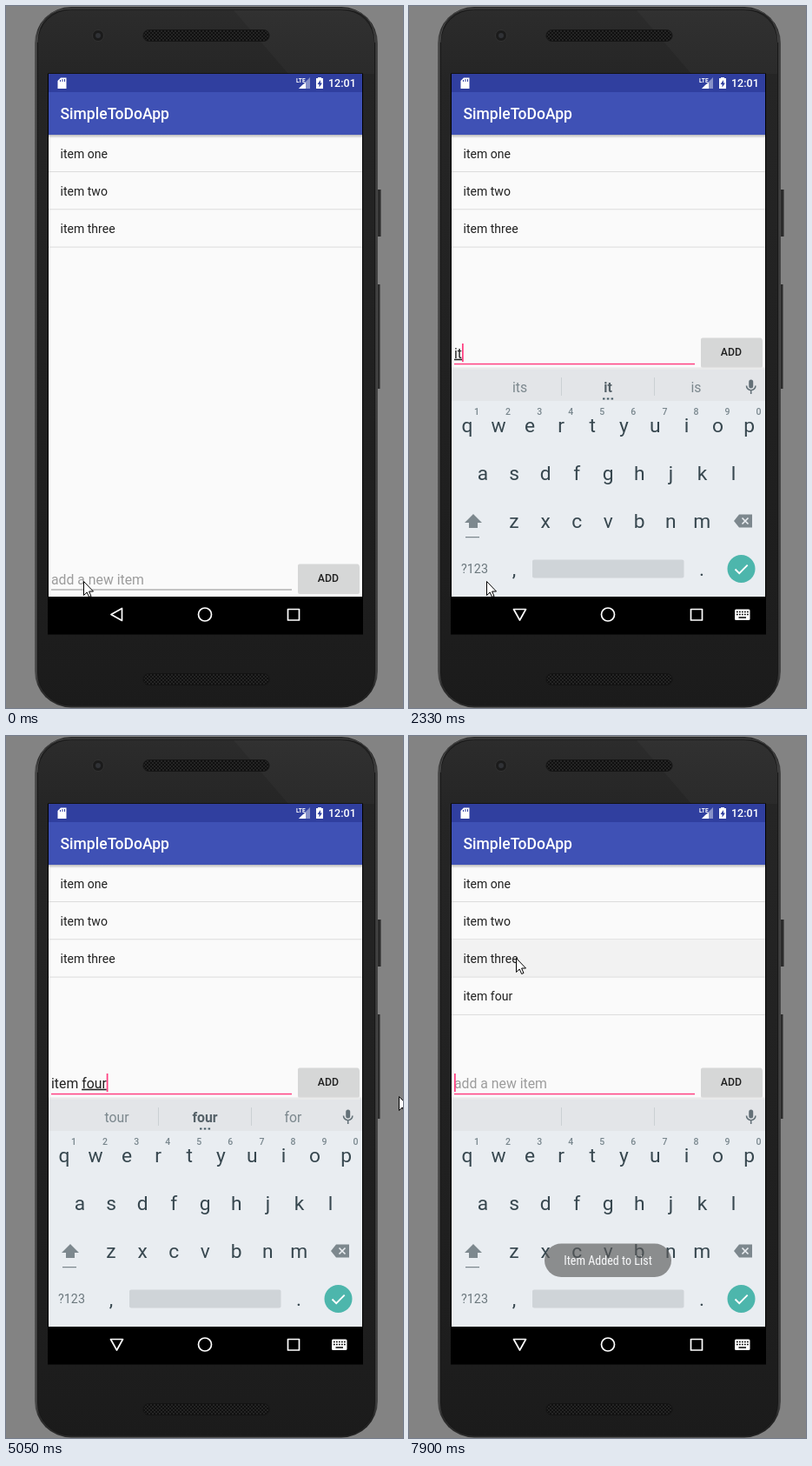
Animation, 457 px wide and 807 px high, one loop 8 s. Source, as an HTML page:

```html
<!DOCTYPE html>
<html lang="en">
<head>
<meta charset="utf-8">
<title>To-do app</title>
<style>
html, body { margin: 0; width: 100%; height: 100%; overflow: hidden; background: #838383; }
svg { display: block; width: 457px; height: 807px; font-family: Roboto, sans-serif; }
text { white-space: pre; }
.mid { text-anchor: middle; }
.row { font-size: 14.05px; fill: #212121; }
.key { font-size: 22.8px; fill: #37474f; }
.num { font-size: 10.5px; font-weight: 500; fill: #78868d; }
.sug { font-size: 15.8px; fill: #7b878d; }
.nav { fill: none; stroke: #fff; stroke-width: 1.7; stroke-linejoin: round; }
#word { text-decoration: underline; }
</style>
</head>
<body>
<svg viewBox="0 0 457 807">
  <defs>
    <linearGradient id="face" x2="0" y2="1">
      <stop offset="0" stop-color="#2c2c2c"/><stop offset=".1" stop-color="#252525"/>
      <stop offset=".9" stop-color="#1d1d1d"/><stop offset="1" stop-color="#1b1b1b"/>
    </linearGradient>
    <linearGradient id="rim">
      <stop offset="0" stop-color="#555"/><stop offset=".012" stop-color="#2a2a2a"/>
      <stop offset=".985" stop-color="#222"/><stop offset="1" stop-color="#484848"/>
    </linearGradient>
    <linearGradient id="shade" x2="0" y2="1">
      <stop offset="0" stop-opacity=".26"/><stop offset="1" stop-opacity="0"/>
    </linearGradient>
    <pattern id="mesh" width="4" height="4" patternUnits="userSpaceOnUse">
      <rect width="4" height="4" fill="#242424"/>
      <path d="M0 0h2v2h-2zM2 2h2v2h-2z" fill="#101010"/>
    </pattern>
  </defs>

  <!-- phone -->
  <rect width="457" height="807" fill="#838383"/>
  <path d="M428 211h3.5v54H428zM428 320h2.5v120H428z" fill="#2b2b2b"/>
  <rect x="33" y="1" width="395" height="805.500" rx="42" fill="url(#rim)"/>
  <rect x="36.500" y="4" width="388" height="800" rx="38" fill="url(#face)" stroke="#181818"/>
  <path d="M36 42Q37 3 76 3H385Q424 3 425 42" fill="none" stroke="#484848"/>
  <path d="M262 5H386Q423 6 424 42V78H325Z" fill="#fff" opacity=".025"/>
  <rect x="158" y="27.500" width="145" height="13" rx="6.500" fill="url(#mesh)" stroke="#151515"/>
  <rect x="158" y="767.500" width="145" height="13" rx="6.500" fill="url(#mesh)" stroke="#131313"/>
  <circle cx="106" cy="34" r="6.500" fill="#1b1b1b" stroke="#333"/>
  <circle cx="106" cy="34" r="3" fill="#303236"/>
  <rect x="48" y="77.500" width="363" height="645" fill="#000"/>

  <!-- app -->
  <rect x="49" y="148" width="361" height="531" fill="#fafafa"/>
  <rect x="49" y="148" width="361" height="4" fill="url(#shade)"/>
  <rect x="49" y="99" width="361" height="49" fill="#3f51b5"/>
  <rect x="49" y="78" width="361" height="21" fill="#303f9f"/>
  <text x="62.500" y="130" font-size="17.560" font-weight="500" fill="#fff">SimpleToDoApp</text>
  <path d="M63 82.500H69.500V95H59.500V86z" fill="#fff"/>
  <path d="M62.500 85v2M65 84v3M67.500 84v3" stroke="#303f9f"/>
  <text x="334" y="87.500" font-size="6.500" font-weight="700" fill="#fff">LTE</text>
  <path d="M350 82V95H337z" fill="#8690c8"/>
  <path d="M345 88V95H337L339 93L341 91z" fill="#fff"/>
  <path d="M359 83V82H363V83H365V95H357V83z" fill="#fff"/>
  <path d="M362 85L358.500 90H360.500V93.500L364 88.500H362z" fill="#303f9f"/>
  <text x="371" y="93" font-size="12.500" font-weight="500" fill="#fff">12:01</text>
  <rect id="press" x="49" y="235" width="361" height="42" fill="#f2f2f2"/>
  <g id="rows"></g>

  <g id="form">
    <rect x="336" y="643" width="71" height="33" rx="2" fill="#000" opacity=".14"/>
    <rect id="button" x="336" y="641.500" width="70.500" height="32.500" rx="2"/>
    <text x="371" y="662.300" class="mid" font-size="12.300" font-weight="500" fill="#212121">ADD</text>
    <rect id="under" x="52" width="277"/>
    <text x="52" y="664.700" font-size="15.800" id="hint" fill="#9c9c9c">add a new item</text>
    <text x="52" y="664.700" font-size="15.800" id="typed" fill="#212121"><tspan id="done"></tspan><tspan id="word"></tspan></text>
    <rect id="caret" y="648" width="1.750" height="21" fill="#ff4081"/>
  </g>

  <!-- keyboard -->
  <g id="board">
    <rect x="49" y="415.500" width="361" height="3" fill="#e9eaea"/>
    <rect x="49" y="418" width="361" height="36" fill="#e3e5e8"/>
    <rect x="49" y="454" width="361" height="225" fill="#e9edf1"/>
    <path d="M175.500 427v21M282.500 427v21" stroke="#cbd0d3"/>
    <g fill="none" stroke="#647178" stroke-width="1.600">
      <path d="M388.500 436.500a5.200 5.200 0 0 0 10.400 0M393.700 442v4"/>
      <path d="M393.700 432v5" stroke-width="5" stroke-linecap="round"/>
    </g>
    <text class="sug mid" x="127.500" y="443.500"></text>
    <text class="sug mid" x="229" y="443.500" font-weight="700" style="fill:#556168"></text>
    <text class="sug mid" x="330.500" y="443.500"></text>
    <path id="dots" d="M223 450.500h2.500v2h-2.500zM227.800 450.500h2.500v2h-2.500zM232.600 450.500h2.500v2h-2.500z" fill="#455a64"/>
    <path d="M74 584L84 594H79V600H69V594H64zM65 610H81V611.300H65z" fill="#7d888e"/>
    <path d="M380 584.500H395V599.500H380L374 592z" fill="#7d888e"/>
    <path d="M383.500 588.500l7 7M390.500 588.500l-7 7" stroke="#e9edf1" stroke-width="1.700"/>
    <text x="75.500" y="652" class="mid" font-size="14.300" fill="#6b777d">?123</text>
    <rect x="142" y="636.500" width="174.500" height="21" rx="2" fill="#cfd4d8"/>
    <circle cx="382.500" cy="647" r="16" fill="#4db6ac"/>
    <path d="M375.500 647.500l4.700 4.700l9.500-9.500" fill="none" stroke="#fff" stroke-width="1.900"/>
  </g>

  <!-- navigation bar -->
  <rect x="49" y="679" width="361" height="43" fill="#000"/>
  <path id="back" class="nav" d="M121 699.500L133.500 692.500V706.500z"/>
  <path id="down" class="nav" d="M120.500 693.500H134.500L127.500 706z"/>
  <circle class="nav" cx="229" cy="699.500" r="7.500"/>
  <rect class="nav" x="324.500" y="693.500" width="13" height="12.500"/>
  <g id="kbIcon">
    <rect x="375" y="693.500" width="17.500" height="12.500" rx="1.500" fill="#fff"/>
    <path d="M377 696.500h14M377 699.500h14" stroke="#000" stroke-width="1.600" stroke-dasharray="1.700 1.300"/>
    <path d="M379.500 703h8.500" stroke="#000" stroke-width="1.500"/>
  </g>

  <g id="toast">
    <rect x="156" y="583.500" width="146" height="38.500" rx="19.250" fill="#585858" fill-opacity=".92"/>
    <text x="229" y="608" class="mid" fill="#fff" style="font:14.05px 'Roboto Condensed',Roboto,sans-serif;font-stretch:75%">Item Added to List</text>
  </g>
  <path id="mouse" d="M.5 .5V16.500L4.200 13L6.700 18.500L9 17.500L6.600 12H11.500z" fill="#fff" stroke="#000"/>
</svg>
<script>
const $ = id => document.getElementById(id);
const add = (parent, tag, attrs, text = '') => {
  const el = document.createElementNS('http://www.w3.org/2000/svg', tag);
  for (const k in attrs) el.setAttribute(k, attrs[k]);
  el.textContent = text;
  return parent.appendChild(el);
};
const show = (id, on) => $(id).setAttribute('visibility', on ? 'visible' : 'hidden');

const rows = ['one', 'two', 'three', 'four'].map((name, i) => {
  const g = add($('rows'), 'g', {});
  add(g, 'text', { x: 62.5, y: 174.6 + i * 43.2, class: 'row' }, 'item ' + name);
  add(g, 'rect', { x: 49, y: 190 + i * 43.3, width: 361, height: 1, fill: '#dcdcdc' });
  return g;
});

const PITCH = 36.06;
const keys = (chars, x, y, cls = 'key') => [...chars].forEach((c, i) =>
  add($('board'), 'text', { x: x + i * PITCH, y, class: cls + ' mid' }, c));
keys('qwertyuiop', 67, 489.5);
keys('1234567890', 78, 470, 'num');
keys('asdfghjkl', 85, 545);
keys('zxcvbnm', 121, 600);
keys(',', 121, 655);
keys('.', 337, 655);

// [time, finished text, word being composed]
const typing = [[0, '', ''], [2050, '', 'i'], [2200, '', 'it'], [2350, '', 'ite'], [2500, '', 'item'],
  [2640, 'item ', ''], [3520, 'item f', ''], [3640, 'item ', 'fo'], [3780, 'item ', 'fou'],
  [3920, 'item ', 'four'], [5740, '', '']];
const hints = [[0, ''], [2050, 'in i it'], [2200, 'its it is'], [2350, 'items item it'],
  [2500, 'items item Item'], [2940, ''], [3640, 'for fo do'], [3780, 'you four for'], [4070, 'tour four for'], [5740, '']];
const blinks = [[0, 0], [400, 1], [940, 0], [1350, 1], [1780, 0], [2050, 1], [3220, 0], [3520, 1],
  [4620, 0], [5050, 1], [5470, 0], [5740, 1], [6270, 0], [6680, 1], [7200, 0], [7750, 1]];
const path = [[4620, 89, 661], [5050, 452, 414], [5620, 380, 397], [5860, 380, 397],
  [6680, 141, 248], [6920, 133, 248], [7200, 133, 248], [7470, 123, 255]];
const fade = [[5620, 0], [5860, .43], [5990, 1], [7750, 1], [7900, .7]];
const ticks = [0, 4620, 4760, 4900, 5050, 5200, 5330, 5470, 5620, 5740, 5860, 5990, 6130,
  6270, 6410, 6540, 6680, 6800, 6920, 7200, 7330, 7470, 7750, 7900];

const latest = (list, t) => list.filter(e => e[0] <= t).pop();
const tween = (list, t) => {
  const i = list.findIndex(e => e[0] > t);
  if (i < 1) return list.at(i).slice(1) && (i ? list.at(-1) : list[0]).slice(1);
  const a = list[i - 1], b = list[i], p = (t - a[0]) / (b[0] - a[0]);
  return a.slice(1).map((v, k) => v + (b[k + 1] - v) * p);
};

function draw(t) {
  const step = ticks.filter(k => k <= t).pop();
  const open = t >= 1220, focus = t >= 280, nav = t >= 520;
  const [, done, word] = latest(typing, t);
  const words = latest(hints, t)[1].split(' ');

  $('form').setAttribute('transform', `translate(0 ${open ? -260 : 0})`);
  $('under').setAttribute('y', focus ? 670.8 : 670.5);
  $('under').setAttribute('height', focus ? 1.5 : 1);
  $('under').setAttribute('fill', focus ? '#ff4081' : '#8f8f8f');
  $('button').setAttribute('fill', t >= 5740 && t < 5990 ? '#c4c5c5' : '#d6d7d7');
  $('done').textContent = done;
  $('word').textContent = word;
  show('hint', !done && !word);
  $('caret').setAttribute('x', 52 + (done || word ? $('typed').getComputedTextLength() : 0));
  show('caret', latest(blinks, t)[1]);

  show('board', open);
  document.querySelectorAll('.sug').forEach((el, i) => el.textContent = words[i] || '');
  $('dots').setAttribute('opacity', words[0] ? 1 : 0);
  show('back', !nav);
  show('down', nav);
  show('kbIcon', nav);

  show('press', t >= 7470);
  rows[3].setAttribute('visibility', t >= 5740 ? 'visible' : 'hidden');
  $('toast').setAttribute('opacity', tween(fade, step)[0]);
  $('mouse').setAttribute('transform', `translate(${tween(path, step).map(Math.round)})`);
}

const start = performance.now();
(function frame() {
  draw((performance.now() - start) % 8000);
  requestAnimationFrame(frame);
})();
</script>
</body>
</html>
```
